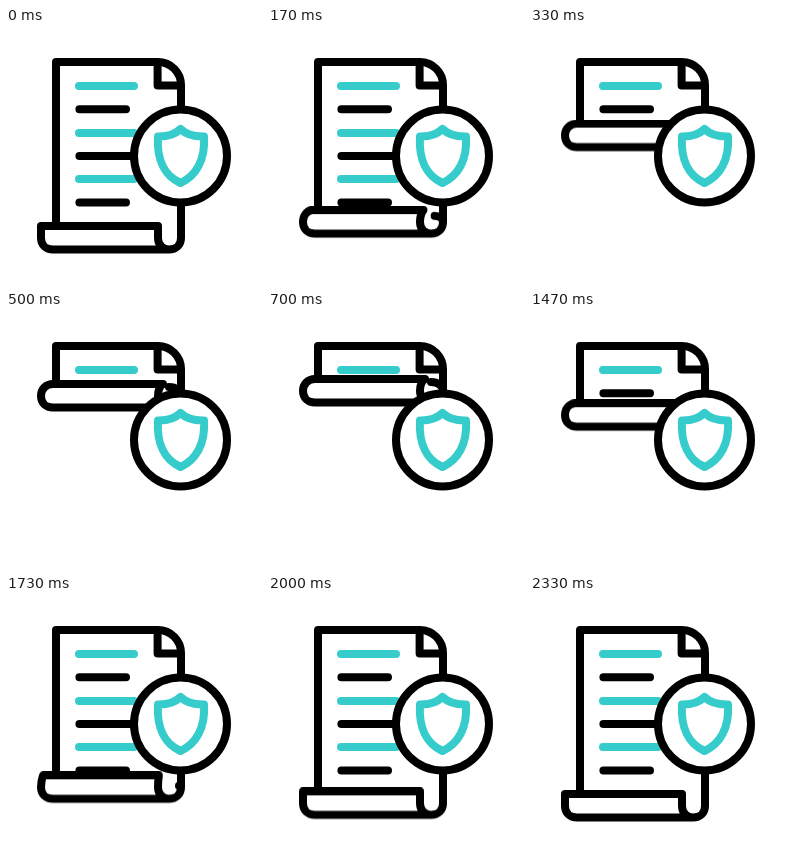
An HTML page without scripts that plays this animation: 256 px wide and 256 px high, repeating every 3000 ms.

```html
<!DOCTYPE html>
<html lang="en">
<head>
<meta charset="utf-8">
<title>Rolling document with shield</title>
<style>
  html, body { margin: 0; width: 100%; height: 100%; overflow: hidden; background: #fff; }
  svg { display: block; width: 100vw; height: 100vh; }
  path, circle {
    fill: none; stroke: #000; stroke-width: 8;
    stroke-linecap: round; stroke-linejoin: round;
  }
  .teal { stroke: #36cccc; }
  .paper { fill: #fff; }
  .roll { animation: roll 3s infinite; }
  .curl { animation: curl 3s infinite; }

  /* The roll travels up the sheet, rests, then unrolls. */
  @keyframes roll {
    0%, 1.33% { transform: translateY(0); animation-timing-function: cubic-bezier(.5, 0, .8, .5); }
    7% { transform: translateY(-30px); animation-timing-function: linear; }
    11% { transform: translateY(-102px); animation-timing-function: cubic-bezier(.1, .5, .4, 1); }
    23.33% { transform: translateY(-131px); }
    38% { transform: translateY(-131px); animation-timing-function: cubic-bezier(.5, 0, .7, .4); }
    49% { transform: translateY(-107px); animation-timing-function: cubic-bezier(.4, .2, .7, .48); }
    55.67% { transform: translateY(-50px); animation-timing-function: linear; }
    57.67% { transform: translateY(-19px); animation-timing-function: cubic-bezier(.05, .5, .3, 1); }
    77.67%, 100% { transform: translateY(0); }
  }

  /* Flat edge with square corners <-> closed tube. */
  @keyframes curl {
    0%, 2%, 68%, 100% {
      d: path("M163 221.5H47C40 221.5 35 217 35 210C35 206 35 202 35 198H152C152 202 152 206 152 210C152 217 157 221.5 163 221.5C170 221.5 175 217 175 210C175 210 175 210 175 210");
    }
    11%, 46% {
      d: path("M163 221.5H47C40 221.5 35 217 35 210C35 203 40 198 47 198H157C154 200 152 204 152 210C152 217 157 221.5 163 221.5C170 221.5 175 217 175 210C175 205 170 201 163 201");
    }
  }
</style>
</head>
<body>
<svg viewBox="0 0 256 256">
  <path d="M50 198V34H152A23 23 0 0 1 175 57V210M151.6 34V57.4H175"/>
  <path class="teal" d="M73 58H128M73 105H128M73 151H128"/>
  <path d="M73.4 81.3H120M73.4 128H126M73.4 174.5H120"/>

  <g class="roll">
    <!-- hides the rolled-up part of the sheet -->
    <rect x="28" y="210" width="156" height="180" fill="#fff"/>
    <path class="paper curl" d="M163 221.5H47C40 221.5 35 217 35 210C35 206 35 202 35 198H152C152 202 152 206 152 210C152 217 157 221.5 163 221.5C170 221.5 175 217 175 210C175 210 175 210 175 210"/>
  </g>

  <circle class="paper" cx="174.5" cy="128" r="46.5"/>
  <path class="teal" d="M174.5 101Q166 109 152 108.5C150.5 132 159 148 174.5 155C190 148 199.5 132 198 108.5Q183 109 174.5 101Z"/>
</svg>
</body>
</html>
```
